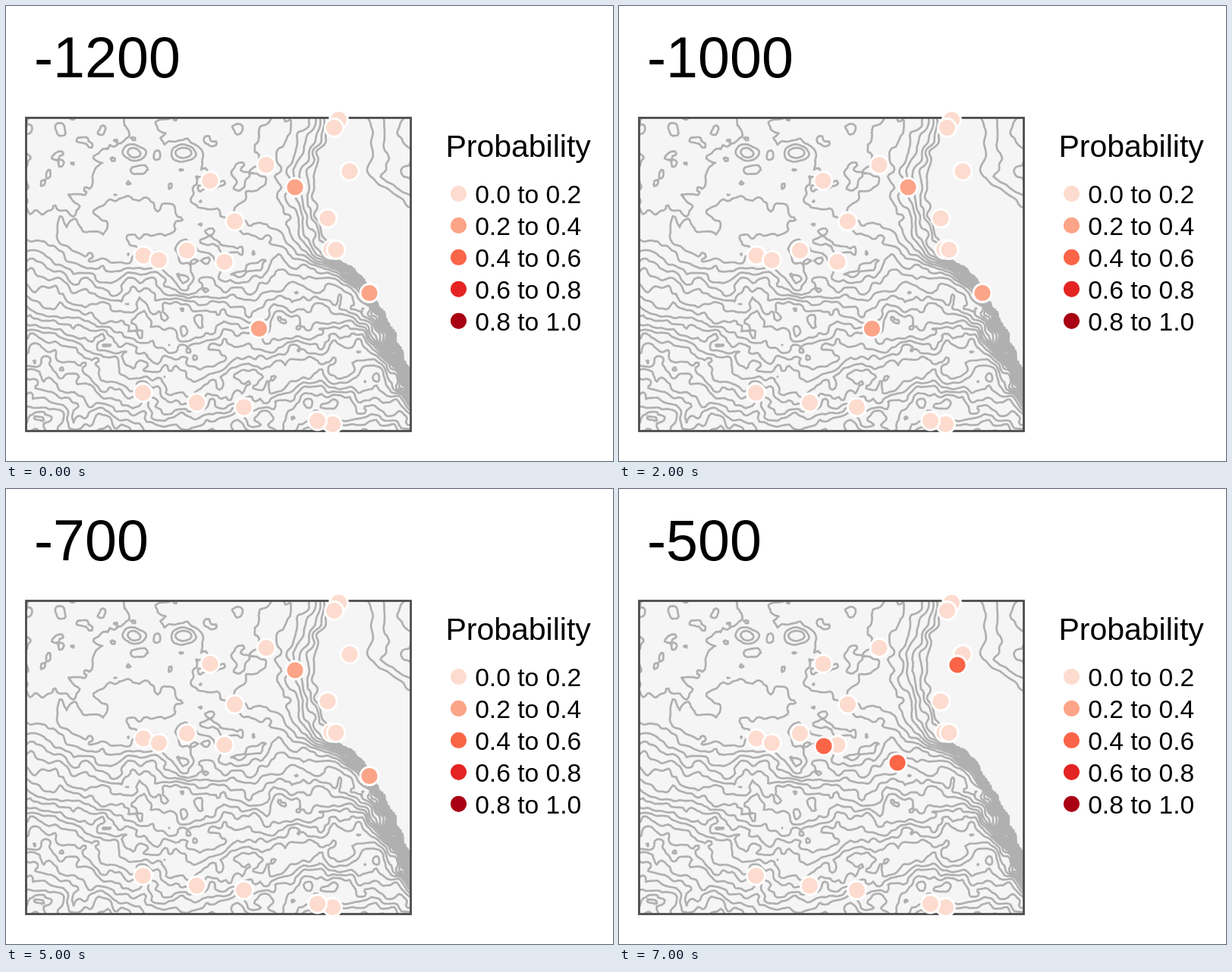
Animation of 800x600 px, one loop 8 s. Source, as an HTML page:

```html
<!DOCTYPE html>
<html lang="en">
<head>
<meta charset="utf-8">
<style>
  html, body { margin: 0; width: 100%; height: 100%; overflow: hidden; background: #fff; }
  svg { display: block; width: 800px; height: 600px; font-family: "Liberation Sans", Arial, sans-serif; }
  circle { stroke: #fff; stroke-width: 2.8; }
</style>
</head>
<body>
<svg viewBox="0 0 800 600">
  <clipPath id="frame"><rect x="26" y="147" width="508" height="414"/></clipPath>
  <rect x="26.5" y="147.5" width="507" height="413" fill="#f5f5f5"/>
  <path id="contours" clip-path="url(#frame)" fill="none" stroke="#b0b0b0" stroke-width="2.7" stroke-linecap="round"/>
  <rect x="26.5" y="147.5" width="507" height="413" fill="none" stroke="#4d4d4d" stroke-width="2.8"/>
  <g id="sites"></g>
  <text id="year" x="37" y="94" font-size="75.4"></text>
  <text x="579.4" y="198.5" font-size="41"> Probability</text>
  <g id="legend" font-size="33.6"></g>
</svg>
<script>
const $ = id => document.getElementById(id);
const colours = ['#fddccf', '#fca487', '#fa6548', '#e42422', '#a90013'];

function add(parent, tag, attrs, text = '') {
  const el = document.createElementNS('http://www.w3.org/2000/svg', tag);
  for (const key in attrs) el.setAttribute(key, attrs[key]);
  el.textContent = text;
  return parent.appendChild(el);
}

// Seeded value noise.
let seed = 11;
const random = () => (seed = seed * 16807 % 2147483647) / 2147483647;
const lattice = Array.from({ length: 4096 }, random);
const mix = (a, b, t) => a + (b - a) * t;
const ramp = (from, to, v) => {
  const t = Math.min(1, Math.max(0, (v - from) / (to - from)));
  return t * t * (3 - 2 * t);
};
function noise(x, y) {
  const i = Math.floor(x), j = Math.floor(y);
  const u = ramp(i, i + 1, x), v = ramp(j, j + 1, y);
  const at = (a, b) => lattice[(a & 63) + (b & 63) * 64];
  return mix(mix(at(i, j), at(i + 1, j), u), mix(at(i, j + 1), at(i + 1, j + 1), u), v);
}

// Terrain: plain in the north-west, rugged south, steep coast, flat sea.
const coast = [[432, 147], [406, 225], [412, 275], [428, 328], [458, 346], [493, 395], [533, 485], [575, 565]];
const peaks = [[168, 193], [235, 194]];

function coastX(y) {
  const i = coast.findIndex(p => p[1] > y);
  const [ax, ay] = coast[i - 1], [bx, by] = coast[i];
  return mix(ax, bx, (y - ay) / (by - ay));
}

const rise = (distance, width) => 1 - Math.exp(-Math.max(0, distance) / width);

function height(x, y) {
  const relief = 1.6 * noise(x / 45, y / 40) + noise(x / 18, y / 18) + 0.5 * noise(x / 8, y / 8);
  const rugged = ramp(290, 400, y + 0.25 * (x - 200));
  const depth = y - 0.3 * Math.min(x, 240) + 0.15 * Math.max(x - 240, 0);
  let land = 6 + relief * (1.1 + 0.7 * rugged) + Math.max(0, depth - 290) / 15;
  for (const [px, py] of peaks) land += 3 * Math.exp(-(((x - px) / 16) ** 2) - ((y - py) / 10) ** 2);
  const wobble = 10 * noise(x / 12, y / 12) - 5;
  const westShore = rise(coastX(y) - x + wobble, mix(42, 15, ramp(310, 365, y)));
  const eastShore = rise(x - 470 - Math.max(0, y - 225) * 1.4 + wobble, 40);
  return 0.3 + westShore * land + eastShore * (2 + relief);
}

function levelLines(x0, y0, x1, y1, step) {
  let d = '';
  const rows = [];
  for (let y = y0; y <= y1; y += step) {
    const row = [];
    for (let x = x0; x <= x1; x += step) row.push([x, y, height(x, y)]);
    rows.push(row);
  }
  const cross = (p, q, level) => {
    const t = (level - p[2]) / (q[2] - p[2]);
    return mix(p[0], q[0], t).toFixed(1) + ' ' + mix(p[1], q[1], t).toFixed(1);
  };
  function slice(...corners) {
    const [a, b, c] = corners.sort((p, q) => p[2] - q[2]);
    for (let level = Math.ceil(a[2]); level < c[2]; level++) {
      d += 'M' + cross(a, c, level) + 'L' + (level < b[2] ? cross(a, b, level) : cross(b, c, level));
    }
  }
  for (let j = 1; j < rows.length; j++) {
    for (let i = 1; i < rows[j].length; i++) {
      slice(rows[j - 1][i - 1], rows[j - 1][i], rows[j][i - 1]);
      slice(rows[j - 1][i], rows[j][i - 1], rows[j][i]);
    }
  }
  return d;
}
$('contours').setAttribute('d', levelLines(26, 147, 536, 563, 3));

// Sites: constant ones, then those shown only from one step to another.
const site = (x, y, level = 0) => add($('sites'), 'circle', { cx: x, cy: y, r: 12, fill: colours[level] });
[[438.5, 150], [432.5, 160.5], [453, 218], [343, 209.5], [269, 230.5], [301.5, 284], [424, 280],
  [429, 321], [435, 321.5], [238.5, 322.5], [181, 329], [201.5, 335], [288, 337.5],
  [180.5, 510], [251.5, 523], [313.5, 529], [430.5, 551.5], [410.5, 547]].forEach(p => site(...p));
const changing = [
  [381, 239, 0, 6], [479, 378.5, 0, 6], [333.5, 425.5, 0, 4],
  [446, 232, 6, 8], [270, 339, 6, 8], [367, 361, 6, 8]
].map(([x, y, from, to]) => ({ el: site(x, y, 1), from, to }));

colours.forEach((fill, i) => {
  const y = 247.5 + i * 41.95;
  add($('legend'), 'circle', { cx: 596.5, cy: y, r: 12, fill });
  add($('legend'), 'text', { x: 618.2, y: y + 12.5 }, `0.${i * 2} to ${((i + 1) / 5).toFixed(1)}`);
});

function render(now) {
  const step = Math.floor(now / 1000) % 8;
  $('year').textContent = -1200 + step * 100;
  for (const { el, from, to } of changing) {
    el.style.display = step >= from && step < to ? '' : 'none';
    el.setAttribute('fill', colours[step === 7 ? 2 : 1]);
  }
  requestAnimationFrame(render);
}
render(0);
</script>
</body>
</html>
```
